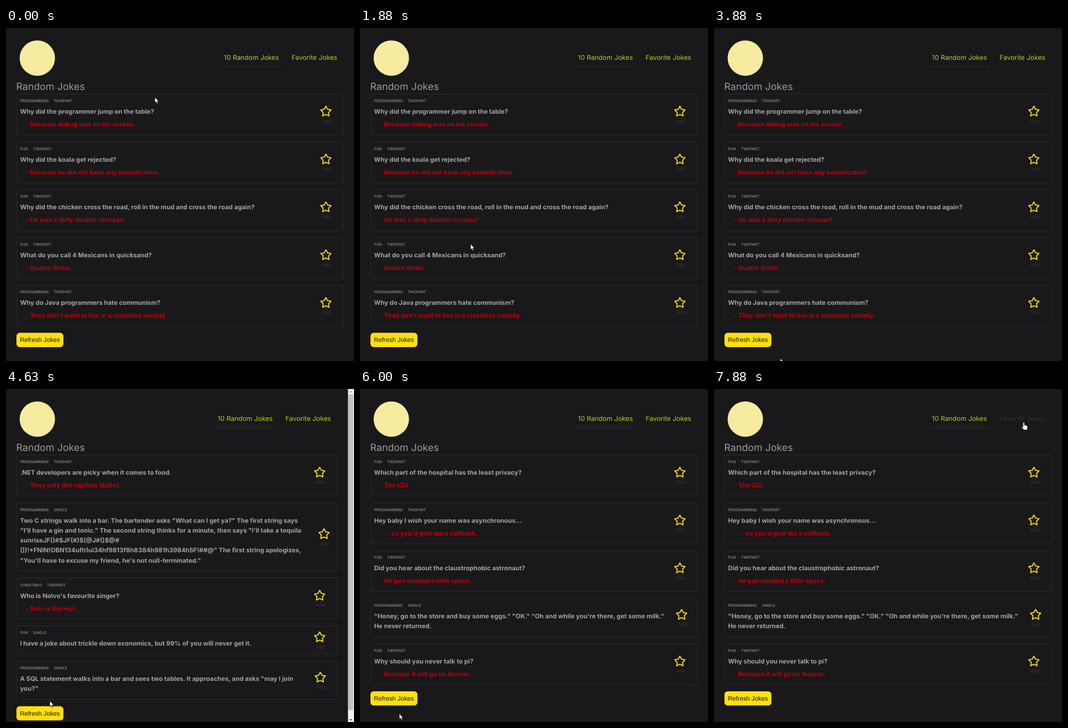
An HTML page that plays this animation: 600x575 px, repeating every 8 s.

```html
<!DOCTYPE html>
<html lang="en">
<head>
<meta charset="utf-8">
<title>Random Jokes</title>
<style>
  html, body { margin: 0; width: 100%; height: 100%; overflow: hidden; background: #19181a; }
  svg { display: block; width: 600px; height: 575px; }
  text { font-family: Inter, sans-serif; text-rendering: geometricPrecision; }
  .title { font-size: 17px; fill: #9a9a9a; }
  .nav { font-size: 11.45px; fill: #b4d21c; }
  .nav.hover { fill: #323232; }
  .tag { font-size: 6.45px; fill: #a6a6a6; }
  .joke { font-size: 10.84px; font-weight: 700; fill: #a3a3a3; }
  .answer { font-size: 10.8px; font-weight: 700; fill: #bc000a; }
  .add { font-size: 8.5px; fill: #353536; }
  .card { fill: none; stroke: #303032; stroke-width: .8; }
  .star { fill: none; stroke: #ffe414; stroke-width: 1.7; stroke-linejoin: round; }
  .button { fill: #ffdf0c; }
  .button.hover { fill: #ffe65a; }
  .label { font: 10.8px "Liberation Sans", Arial, sans-serif; fill: #111; }
  .cursor { fill: #fff; stroke: #111; stroke-width: .8; stroke-linejoin: round; }
</style>
</head>
<body>
<svg id="stage" viewBox="0 0 600 575">
  <rect width="600" height="575" fill="#19181a"/>
  <circle cx="54" cy="52" r="30.5" fill="#f6eb9f"/>
  <text class="title" x="17.5" y="106.6">Random Jokes</text>
</svg>
<script>
const LOOP = 8000, STEP = 125;
const TOP = 114, LINE = 17.25, GAP = 12;
const stage = document.getElementById('stage');

function add(parent, tag, attrs, text) {
  const el = document.createElementNS('http://www.w3.org/2000/svg', tag);
  for (const key in attrs) el.setAttribute(key, attrs[key]);
  if (text) el.textContent = text;
  parent.appendChild(el);
  return el;
}

function label(parent, cls, x, y, text) {
  return add(parent, 'text', { class: cls, x, y }, text);
}

// Each joke: tag, lines, answer (if any), star shift.
const pages = [
  { start: 0, right: 581.5, jokes: [
    ['PROGRAMMING', ['Why did the programmer jump on the table?'], 'Because debug was on his screen.'],
    ['PUN', ['Why did the koala get rejected?'], 'Because he did not have any koalafication.'],
    ['PUN', ['Why did the chicken cross the road, roll in the mud and cross the road again?'], 'He was a dirty double-crosser!'],
    ['PUN', ['What do you call 4 Mexicans in quicksand?'], 'Quatro Sinko.'],
    ['PROGRAMMING', ['Why do Java programmers hate communism?'], "They don't want to live in a classless society."]
  ] },
  { start: 4625, right: 570.8, scrollbar: true, jokes: [
    ['PROGRAMMING', ['.NET developers are picky when it comes to food.'], 'They only like chicken NuGet.'],
    ['PROGRAMMING', [
      'Two C strings walk into a bar. The bartender asks "What can I get ya?" The first string says',
      '"I\'ll have a gin and tonic." The second string thinks for a minute, then says "I\'ll take a tequila',
      'sunriseJF()#$JF(#)$(@J#()$@#',
      '())!*FNIN!OBN134ufh1ui34hf9813f8h8384h981h3984h5F!##@" The first string apologizes,',
      '"You\'ll have to excuse my friend, he\'s not null-terminated."'], '', 7.5],
    ['CHRISTMAS', ["Who is Nolvo's favourite singer?"], 'Sno-la Darvey!'],
    ['PUN', ['I have a joke about trickle down economics, but 99% of you will never get it.'], ''],
    ['PROGRAMMING', [
      'A SQL statement walks into a bar and sees two tables. It approaches, and asks "may I join',
      'you?"'], '', 1]
  ] },
  { start: 6000, right: 581.5, jokes: [
    ['PUN', ['Which part of the hospital has the least privacy?'], 'The ICU.'],
    ['PROGRAMMING', ['Hey baby I wish your name was asynchronous...'], "... so you'd give me a callback."],
    ['PUN', ['Did you hear about the claustrophobic astronaut?'], 'He just needed a little space.'],
    ['PROGRAMMING', [
      '"Honey, go to the store and buy some eggs." "OK." "Oh and while you\'re there, get some milk."',
      'He never returned.'], '', 3],
    ['PUN', ['Why should you never talk to pi?'], 'Because it will go on forever.']
  ] }
];

function starPoints(cx, cy) {
  return Array.from({ length: 10 }, (_, i) => {
    const r = i % 2 ? 4.9 : 9.3, a = i * Math.PI / 5;
    return (cx + r * Math.sin(a)).toFixed(2) + ',' + (cy - r * Math.cos(a)).toFixed(2);
  }).join(' ');
}

function drawCard(parent, top, right, [tag, lines, answer, shift = 0]) {
  const height = answer ? 70.6 : 49 + LINE * (lines.length - 1);
  add(parent, 'rect', { class: 'card', x: 18.3, y: top, width: right - 18.3, height, rx: 2.8 });
  const tags = label(parent, 'tag', 24.2, top + 13.9);
  add(tags, 'tspan', {}, tag);
  add(tags, 'tspan', { dx: 8.6 }, answer ? 'TWOPART' : 'SINGLE');
  lines.forEach((line, i) => label(parent, 'joke', 24.2, top + 34 + i * LINE, line));
  if (answer) label(parent, 'answer', 33.7, top + 55.9, '- ' + answer);
  const x = right - 30 + shift, y = top + height / 2 - 5;
  add(parent, 'polygon', { class: 'star', points: starPoints(x, y) });
  label(parent, 'add', x - 6.6, y + 19.4, 'Add');
  return height;
}

function drawScrollbar(parent) {
  add(parent, 'rect', { x: 589.6, y: 0, width: 10.4, height: 575, fill: '#f1f1f1' });
  add(parent, 'rect', { x: 590, y: 9.5, width: 8.8, height: 545, fill: '#c1c1c1' });
  add(parent, 'path', { d: 'M592 6 L594.5 3 L597 6Z', fill: '#a3a3a3' });
  add(parent, 'path', { d: 'M592 570 L594.5 573 L597 570Z', fill: '#505050' });
}

function drawPage(page) {
  const g = page.group = add(stage, 'g', {});
  const dx = page.right - 581.5;
  page.navX = 492.5 + dx;
  label(g, 'nav', 375.8 + dx, 55.2, '10 Random Jokes');
  page.link = label(g, 'nav', page.navX, 55.2, 'Favorite Jokes');
  add(g, 'rect', { x: 371.3 + dx, y: 66.2, width: 104.8, height: .8, fill: '#353537' });

  let top = TOP, bottom;
  for (const joke of page.jokes) {
    bottom = top + drawCard(g, top, page.right, joke);
    top = bottom + GAP;
  }
  page.buttonY = bottom + 11.3;
  page.button = add(g, 'rect', { class: 'button', x: 18, y: page.buttonY, width: 81, height: 24.6, rx: 5.6 });
  label(g, 'label', 24, page.buttonY + 15.9, 'Refresh Jokes');
  if (page.scrollbar) drawScrollbar(g);
}

pages.forEach(drawPage);

const cursor = add(stage, 'g', { class: 'cursor' });
const arrow = add(cursor, 'path', { d: 'M0 0V9.8L2.2 7.8L3.8 11.4L5.5 10.7L3.9 7.2H6.9Z' });
const hand = add(cursor, 'path', {
  d: 'M-.2 1.3A1.3 1.3 0 0 1 2.4 1.3V4.9Q4 4.3 4.6 5.4Q6 5 6.4 6.2Q7.8 6 7.8 7.4V9.6' +
     'Q7.6 11.6 6.7 13.3H.9Q.2 11 -2.3 8.6Q-2.6 7.2 -1.5 7.2Q-.7 7.4 -.2 8.2Z'
});

// Pointer path: time, x, y
const path = [
  [0, 256.7, 119.5], [500, 246, 166], [1000, 228, 245], [1500, 205, 322], [1875, 190.7, 373],
  [2500, 176, 408], [3000, 158, 446], [3500, 136, 490], [3875, 114.3, 570.5],
  [4125, 88, 552], [4250, 75.5, 538.5], [5250, 75.5, 538.5], [5625, 69, 558],
  [5750, 67.8, 560.4], [6625, 67.8, 560.9], [6875, 130, 490], [7125, 280, 315],
  [7375, 440, 150], [7500, 500, 95], [7625, 527, 64], [7750, 533, 57.5], [LOOP, 533, 57.5]
];

function pointerAt(t) {
  const i = Math.max(1, path.findIndex(p => p[0] >= t));
  const [t0, x0, y0] = path[i - 1], [t1, x1, y1] = path[i];
  const k = (t - t0) / (t1 - t0);
  return [x0 + (x1 - x0) * k, y0 + (y1 - y0) * k];
}

function render(now) {
  const t = Math.floor((now % LOOP) / STEP) * STEP;
  const [x, y] = pointerAt(t);
  const current = pages.filter(p => p.start <= t).pop();
  const onButton = x > 18 && x < 99 && y > current.buttonY && y < current.buttonY + 24.6;
  const onLink = x > current.navX - 5 && x < current.navX + 85 && y > 35 && y < 67;

  for (const p of pages) p.group.style.display = p === current ? '' : 'none';
  current.button.classList.toggle('hover', onButton);
  current.link.classList.toggle('hover', onLink);
  arrow.style.display = onButton || onLink ? 'none' : '';
  hand.style.display = onButton || onLink ? '' : 'none';
  cursor.setAttribute('transform', `translate(${x} ${y})`);
}

const began = performance.now();
function tick() {
  render(performance.now() - began);
  requestAnimationFrame(tick);
}
tick();
</script>
</body>
</html>
```
